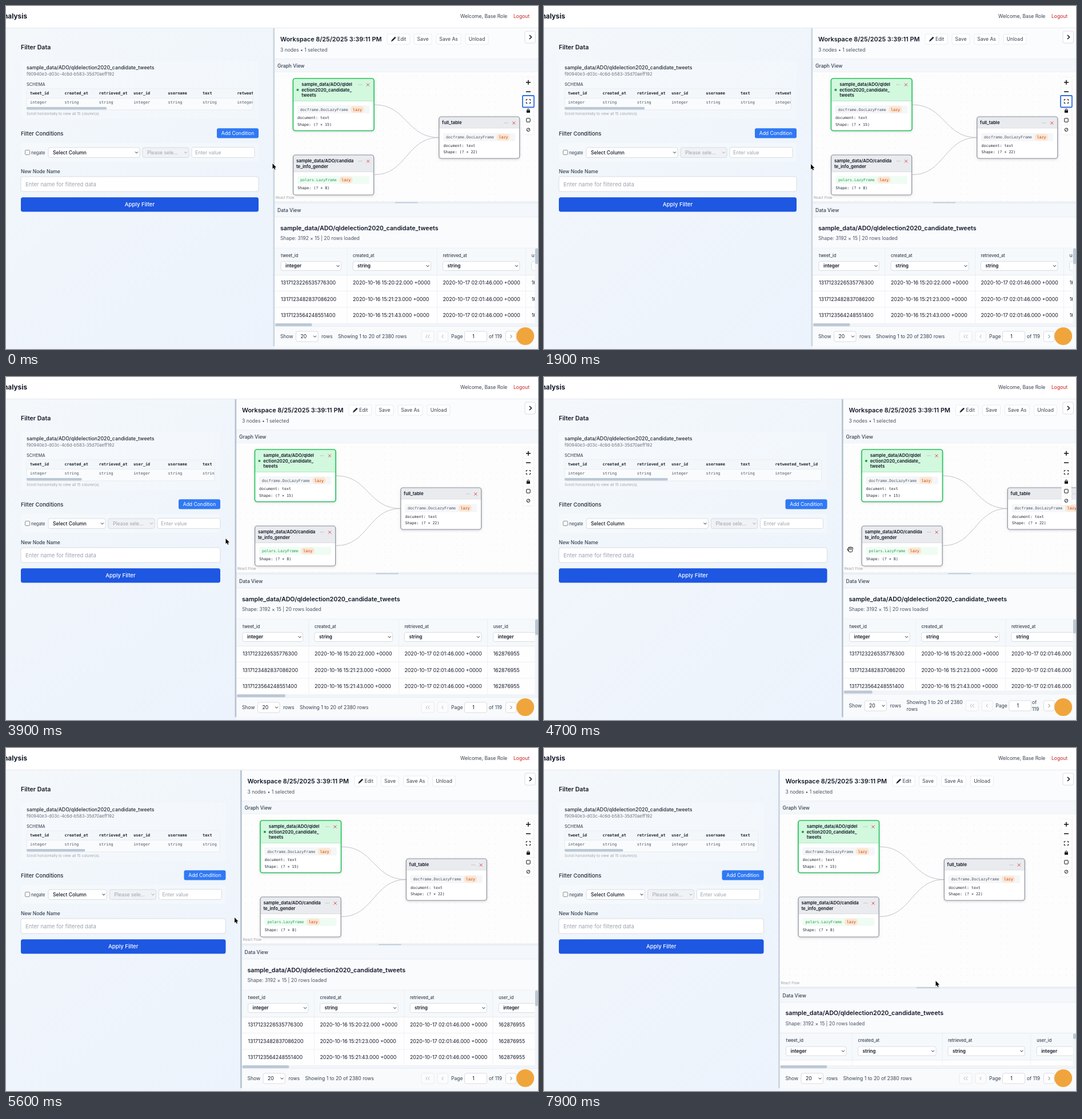
Animation of 931 by 601 pixels, one loop 8000 ms. Source, as an HTML page with a canvas:

```html
<!DOCTYPE html>
<html lang="en">
<head>
<meta charset="utf-8">
<title>Workspace panels</title>
<style>
html, body { margin: 0; width: 100%; height: 100%; overflow: hidden; background: #fff; }
canvas { display: block; width: 931px; height: 601px; }
</style>
</head>
<body>
<canvas id="stage"></canvas>
<script>
const W = 931, H = 601, LOOP = 8000, STEP = 100;
const canvas = document.getElementById('stage');
const c = canvas.getContext('2d');
const dpr = window.devicePixelRatio || 1;
canvas.width = W * dpr;
canvas.height = H * dpr;

const SANS = 'Inter, "Open Sans", sans-serif';
const MONO = '"DejaVu Sans Mono", monospace';
const INK = '#1f2937', MUTED = '#4b5563', FAINT = '#9ca3af', LINE = '#e3e7ed', EDGE = '#d1d5db';
const TABLE = 'sample_data/ADO/qldelection2020_candidate_tweets';

// Motion: [time, value...] keys, eased between neighbours
const splitKeys = [[2700, 470], [3900, 403], [4700, 523.5], [5500, 412.5]];
const paneKeys = [[6400, 342.5], [7200, 278], [7900, 418]];
const mouseKeys = [
  [0, 466.5, 276], [1900, 467, 277], [2700, 468, 278], [3900, 384.5, 283], [4700, 536, 302],
  [5500, 400, 297], [5700, 400, 297], [6400, 672, 341], [7200, 676, 266.5], [7900, 685.5, 408]
];

function at(keys, t) {
  const next = keys.findIndex(k => k[0] > t);
  if (next === 0) return keys[0].slice(1);
  if (next < 0) return keys[keys.length - 1].slice(1);
  const a = keys[next - 1], b = keys[next];
  const u = (t - a[0]) / (b[0] - a[0]), e = u * u * (3 - 2 * u);
  return a.slice(1).map((v, i) => v + (b[i + 1] - v) * e);
}

// Drawing helpers; text y is the middle of the capitals
function text(s, x, y, size = 8.55, color = INK, weight = 400, align = 'left', family = SANS) {
  c.font = `${weight} ${size}px ${family}`;
  c.fillStyle = color;
  c.textAlign = align;
  c.fillText(s, x, y + size * 0.36);
}
const mono = (s, x, y, color = INK, size = 6.65, weight = 400) =>
  text(s, x, y, size, color, weight, 'left', MONO);

function rect(x, y, w, h, fill) {
  c.fillStyle = fill;
  c.fillRect(x, y, w, h);
}

function box(x, y, w, h, fill, stroke, r = 3, lw = 0.8) {
  c.beginPath();
  c.roundRect(x, y, w, h, r);
  if (fill) { c.fillStyle = fill; c.fill(); }
  if (stroke) { c.strokeStyle = stroke; c.lineWidth = lw; c.stroke(); }
}

function line(points, color, lw = 1) {
  c.beginPath();
  for (let i = 0; i < points.length; i += 2) c.lineTo(points[i], points[i + 1]);
  c.strokeStyle = color;
  c.lineWidth = lw;
  c.stroke();
}

function disc(x, y, r, fill) {
  c.beginPath();
  c.arc(x, y, r, 0, 7);
  c.fillStyle = fill;
  c.fill();
}

function clipped(x, y, w, h, draw) {
  c.save();
  c.beginPath();
  c.rect(x, y, w, h);
  c.clip();
  draw();
  c.restore();
}

const chevron = (x, y, color = INK) => line([x - 2.4, y - 1.3, x, y + 1.3, x + 2.4, y - 1.3], color, 1);

function select(label, x, y, w, h, weight = 400, size = 8.6, off = false) {
  box(x, y, w, h, off ? '#f0f2f5' : '#fff', EDGE);
  text(label, x + 8, y + h / 2, size, off ? FAINT : '#111827', weight);
  chevron(x + w - 5.5, y + h / 2, off ? FAINT : INK);
}

function button(label, x, y, w, h = 18) {
  box(x, y, w, h, '#fff', LINE);
  text(label, x + w / 2, y + h / 2, 8.55, '#374151', 400, 'center');
}

function header() {
  rect(0, 0, W, 38, '#fff');
  rect(0, 38, W, 0.8, LINE);
  text('Analysis', 37, 18, 11.8, '#111827', 700, 'right');
  text('Welcome, Base Role', 795, 18, 8.55, '#374151');
  text('Logout', 888, 18, 8.55, '#c81e1e');
}

function filterPanel(R) {
  const g = c.createLinearGradient(0, 38, R, 601);
  g.addColorStop(0, '#f4f8fb');
  g.addColorStop(0.5, '#eff5fb');
  g.addColorStop(1, '#edf3fc');
  rect(0, 38, R, 563, g);
  const right = R - 28, mid = (26 + right) / 2;

  text('Filter Data', 26, 72.5, 10.6, '#111827', 600);
  box(26, 96, right - 26, 102, 'rgba(255,255,255,.2)', null, 4);
  text(TABLE, 36, 108, 8.75, INK, 500);
  text('f90940e3-d03c-4c6d-b583-35d70aeff192', 36, 119.5, 7.55, '#6b7280');
  text('SCHEMA', 36, 137, 7.5, '#4b5563', 500);

  const view = R - 74;
  box(36, 145, view, 37, '#f9fbfd', LINE, 2);
  clipped(36, 145, view, 37, () => {
    rect(36, 145.5, view, 15.5, '#f4f7fa');
    rect(36, 161, view, 0.7, LINE);
    const columns = ['tweet_id', 'created_at', 'retrieved_at', 'user_id', 'username', 'text', 'retweeted_tweet_id'];
    columns.forEach((name, i) => {
      const x = 42 + i * 60.4;
      mono(name, x, 153, INK, 6.9, 700);
      mono(i % 3 ? 'string' : 'integer', x, 169, MUTED, 6.9);
    });
    box(36, 177, view * view / 1118, 4.5, '#bcc8d5', null, 2.2);
  });
  text('Scroll horizontally to view all 15 column(s).', 36, 189, 6.45, FAINT);

  text('Filter Conditions', 26, 223.5, 9.5, INK, 500);
  box(right - 73, 214.2, 73, 17.3, '#3079f4', null, 3);
  text('Add Condition', right - 36.5, 223, 8.55, '#fff', 400, 'center');

  box(26, 240, right - 26, 33, 'rgba(255,255,255,.25)', null, 4);
  box(33.5, 252.5, 8, 8, '#fff', '#767676', 1.5);
  text('negate', 44, 257, 7.55, '#374151');
  const end = Math.max(174, R - 236);
  select('Select Column', 74, 248, end - 74, 17.5, 500, 8.5);
  select('Please sele...', end + 5, 248, 81, 17.5, 400, 8.6, true);
  box(end + 91, 247.5, 110, 18, '#fff', EDGE);
  text('Enter value', end + 97, 256.5, 8.6, FAINT);

  text('New Node Name', 26, 290, 8.55, '#374151', 500);
  box(26, 299, right - 26, 26, '#fff', EDGE, 3.5);
  text('Enter name for filtered data', 34, 312.5, 9.6, FAINT);
  box(26, 335.2, right - 26, 25.2, '#1d57e2', null, 3.5);
  text('Apply Filter', mid, 348, 9.6, '#fff', 500, 'center');
}

function titleBar(R) {
  rect(R, 38.8, W - R, 54, '#fbfcfd');
  text('Workspace 8/25/2025 3:39:11 PM', R + 10, 58.5, 10.85, '#111827', 600);
  text('3 nodes • 1 selected', R + 10, 76.5, 8.55, MUTED);
  box(R + 197, 49, 39.5, 18, '#fff', LINE);
  line([R + 205.6, 60.6, R + 211.6, 54.6], INK, 2.7);
  line([R + 204.3, 62, R + 206.5, 59.8], INK, 1.4);
  text('Edit', R + 215, 58, 8.55, '#374151');
  button('Save', R + 244, 49, 31);
  button('Save As', R + 283, 49, 43);
  button('Unload', R + 334, 49, 40);
  box(908, 44, 18.5, 21, '#fff', EDGE, 3);
  line([916, 51, 919.6, 54.5, 916, 58], '#111827', 1.6);
  rect(R, 92.5, W - R, 23.5, '#f4f7fb');
  rect(R, 92.5, W - R, 0.7, '#e8ecf2');
  rect(R, 115.6, W - R, 0.7, LINE);
  text('Graph View', R + 5, 104.5, 8.55, '#374151', 500);
}

function node(x, y, w, h, head, titles, rows, { live, pill, type, lazy }) {
  c.save();
  c.shadowColor = 'rgba(0,0,0,.18)';
  c.shadowBlur = 4;
  c.shadowOffsetY = 1.5;
  box(x, y, w, h, '#fff', null, 4);
  c.restore();
  box(x, y, w, head, live ? '#d2f8de' : '#e9ebee', null, [4, 4, 0, 0]);
  rect(x, y + head, w, 0.8, live ? '#9be7b4' : EDGE);
  box(x, y, w, h, null, live ? '#27c45f' : '#8b919d', 4, live ? 1.7 : 1.2);
  if (live) disc(x + 8, y + 20, 2.1, '#17a34a');
  titles.forEach((s, i) => text(s, x + (live ? 14.8 : 5.3), y + 10.2 + i * 9.6, 7.8, '#111827', 600));
  for (let i = 0; i < 3; i++) disc(x + 115 + i * 2.6, y + 10.8, 0.6, '#8b929c');
  line([x + 128.5, y + 8.5, x + 133.5, y + 13.5], '#e5484d', 1);
  line([x + 133.5, y + 8.5, x + 128.5, y + 13.5], '#e5484d', 1);
  const py = y + pill;
  box(x + 7.3, py - 7, w - 15, 14, type[0] === 'p' ? '#effcf3' : '#f5f6f8', null, 2);
  mono(type, x + 12.3, py, type[0] === 'p' ? '#1f9d4d' : MUTED);
  box(x + lazy, py - 5.8, 23, 11.6, '#fbe6d2', null, 5);
  mono('lazy', x + lazy + 3.6, py, '#c2410c');
  rows.forEach((s, i) => mono(s, x + 7.6, py + 14.4 + i * 11.5, INK));
}

function controls(focused) {
  c.save();
  c.shadowColor = 'rgba(0,0,0,.12)';
  c.shadowBlur = 2;
  rect(905.5, 125.5, 17.5, 99.5, '#fefefe');
  c.restore();
  for (let i = 1; i < 6; i++) rect(905.5, 125.5 + i * 16.6, 17.5, 0.6, '#eceef1');
  const x = 914, K = '#111';
  line([x - 4, 133.8, x + 4, 133.8], K, 1.5);
  line([x, 129.8, x, 137.8], K, 1.5);
  line([x - 4, 150.3, x + 4, 150.3], K, 1.4);
  for (const sx of [-1, 1]) for (const sy of [-1, 1])
    line([x + sx * 3.6, 167 + sy * 1.2, x + sx * 3.6, 167 + sy * 3.3, x + sx * 1.4, 167 + sy * 3.3], K, 1.1);
  rect(x - 3, 182.5, 6, 4.5, K);
  c.beginPath();
  c.arc(x, 182.3, 1.9, Math.PI, 0);
  c.strokeStyle = K;
  c.lineWidth = 1;
  c.stroke();
  box(x - 3.2, 196.8, 6.4, 6.4, null, K, 0.6, 1);
  c.beginPath();
  c.arc(x, 216.8, 2.8, 0, 7);
  c.lineWidth = 0.9;
  c.stroke();
  line([x - 1.9, 218.7, x + 1.9, 214.9], K, 0.8);
  if (focused) box(904, 157, 20, 20.5, null, '#2f6fe4', 1.5, 1.8);
}

function graph(R, V, focused) {
  clipped(R, 116, W - R, V - 116, () => {
    rect(R, 116, W - R, V - 116, '#fdfdfd');
    for (let x = R + 6; x < W; x += 11.5)
      for (let y = 122; y < V; y += 11.5) rect(x, y, 0.8, 0.8, '#d9dce3');
    for (const y of [173, 295.5]) {
      c.beginPath();
      c.moveTo(R + 175, y);
      c.bezierCurveTo(R + 231, y, R + 231, 230.5, R + 287.5, 230.5);
      c.strokeStyle = '#b1b1bb';
      c.lineWidth = 0.8;
      c.stroke();
    }
    node(R + 32.4, 127, 141.6, 91.5, 39, ['sample_data/ADO/qldel', 'ection2020_candidate_', 'tweets'],
      ['document: text', 'Shape: (? × 15)'], { live: true, pill: 54.3, type: 'docframe.DocLazyFrame', lazy: 101 });
    node(R + 32.6, 261, 141, 70, 29, ['sample_data/ADO/candida', 'te_info_gender'],
      ['Shape: (? × 8)'], { pill: 43.7, type: 'polars.LazyFrame', lazy: 81 });
    node(R + 287.8, 194, 141, 73, 19.5, ['full_table'],
      ['document: text', 'Shape: (? × 22)'], { pill: 35.8, type: 'docframe.DocLazyFrame', lazy: 101 });
    controls(focused);
    rect(R, V - 11, 36, 11, 'rgba(255,255,255,.5)');
    text('React Flow', R + 2, V - 6.5, 6.3, '#9a9ca3');
  });
}

function dataView(R, V, bottom, dragging) {
  rect(R, V, W - R, 596 - V, '#f9fbfd');
  rect(R, V, W - R, 4, dragging ? '#d9e0e8' : '#eaeff5');
  box((R + W) / 2 - 20, V + 1.2, 40, 1.6, '#b7c6d4', null, 0.8);
  rect(R, V + 4, W - R, 23, '#f4f7fb');
  rect(R, V + 27, W - R, 0.7, LINE);
  text('Data View', R + 5, V + 15.7, 8.55, '#374151', 500);
  text(TABLE, R + 10, V + 46.5, 10.68, '#111827', 600);
  text('Shape: 3192 × 15 | 20 rows loaded', R + 10, V + 64.5, 8.55, MUTED);

  const top = V + 81, view = 925.5 - R, tall = bottom - top;
  const columns = [
    ['tweet_id', 'integer', 11, 105.5], ['created_at', 'string', 137, 136.5],
    ['retrieved_at', 'string', 294.4, 134.5], ['user_id', 'integer', 449.7, 105]
  ];
  const ids = ['3226535776300', '3482837086200', '3564248551400', '3704678019000', '4150243152000'];
  const times = ['20:22', '21:23', '21:43', '22:16', '24:03'];
  clipped(R, top, view, tall, () => {
    rect(R, top, view, tall, '#fefefe');
    rect(R, top, view, 47.5, '#f6f9fb');
    rect(R, top, view, 0.8, LINE);
    rect(R, top + 47.5, view, 0.8, LINE);
    columns.forEach(([name, type, x, w]) => {
      text(name, R + x, V + 94.5, 7.5, '#374151', 500);
      select(type, R + x, V + 105, w, 16, 600, 8.2);
    });
    ids.forEach((id, i) => {
      const y = V + 142.7 + i * 28.35;
      const row = ['131712' + id, `2020-10-16 15:${times[i]}.000 +0000`, '2020-10-17 02:01:46.000 +0000', '162876955'];
      row.forEach((s, k) => text(s, R + columns[k][2], y, 8.8, '#111827'));
      rect(R, y + 14, view, 0.8, '#e8ebf0');
    });
    for (const x of [126.5, 284, 439]) rect(R + x, top, 0.7, tall, '#e8ebf0');
  });
  rect(R, bottom, W - R, 5, '#f1f4f8');
  box(R + 1, bottom, view * view / 3215, 5, '#bcc8d5', null, 2.5);
  rect(925.5, top, 5.5, tall, '#f1f4f8');
  box(926, top + 1, 5, Math.max(10, tall * tall / 635), '#bcc8d5', null, 2.5);
}

function pager(R, wrap) {
  const y = wrap ? 576 : 579, gray = '#374151', shift = wrap ? 11.3 : 0;
  rect(R, wrap ? 555 : 561, W - R, 41, '#f8fafc');
  rect(R, wrap ? 555 : 561, W - R, 0.7, LINE);
  text('Show', R + 10, y, 8.55, gray);
  select('20', R + 37.5, y - 9, 38.5, 18);
  text('rows', R + 82, y, 8.55, gray);
  if (wrap) {
    text('Showing 1 to 20 of 2380', R + 111, 569.7, 8.55, gray);
    text('rows', R + 111, 582, 8.55, gray);
    text('of', 854, 569.7, 8.55, gray);
    text('119', 854, 582, 8.55, gray);
  } else {
    text('Showing 1 to 20 of 2380 rows', R + 111, y, 8.55, gray);
    text('of 119', 845, y, 8.55, gray);
  }
  const arrow = (x, dir, color) => line([x - dir * 1.3, y - 3, x + dir * 1.3, y, x - dir * 1.3, y + 3], color, 0.8);
  box(727 + shift, y - 9, 22, 18, '#fcfcfd', LINE);
  arrow(736 + shift, -1, FAINT);
  arrow(740 + shift, -1, FAINT);
  box(755 + shift, y - 9, 18.5, 18, '#fcfcfd', LINE);
  arrow(764 + shift, -1, FAINT);
  text('Page', 779 + shift, y, 8.55, gray);
  box(802.5 + shift, y - 9, 39, 18, '#fff', EDGE);
  text('1', 818 + shift, y, 8.55, '#111827', 400, 'center');
  box(874.5, y - 9, 18.5, 18, '#fff', EDGE);
  arrow(884, 1, MUTED);
}

function pointer(x, y) {
  c.beginPath();
  [[0, 0], [0, 9.3], [2.1, 7.4], [3.6, 10.8], [5.1, 10.1], [3.6, 6.9], [6.4, 6.7]]
    .forEach(([px, py]) => c.lineTo(x + px, y + py));
  c.closePath();
  c.lineJoin = 'round';
  c.strokeStyle = '#fff';
  c.lineWidth = 1.4;
  c.stroke();
  c.fillStyle = '#000';
  c.fill();
}

function hand(x, y) {
  const finger = points => {
    line(points, '#111', 2.9);
    line(points, '#fff', 1.3);
  };
  c.save();
  c.lineCap = c.lineJoin = 'round';
  finger([x - 4, y + 0.2, x - 2, y + 2.6]);
  box(x - 2.8, y - 0.2, 6.4, 4.8, '#fff', '#111', 2, 1);
  [-2.4, -0.6, 1.2, 3].forEach((fx, i) =>
    finger([x + fx * 1.15, y - 3.4 + Math.abs(i - 1.4) * 0.7, x + fx, y + 0.6]));
  rect(x - 2.2, y + 0.8, 5.2, 2.6, '#fff');
  c.restore();
}

function render(t) {
  const [R] = at(splitKeys, t), [V] = at(paneKeys, t), [mx, my] = at(mouseKeys, t);
  const wrap = R > 484, sizing = t > 2300 && t < 5800;
  c.setTransform(dpr, 0, 0, dpr, 0, 0);
  rect(0, 0, W, H, '#f4f8fd');
  filterPanel(R);
  titleBar(R);
  graph(R, V, t < 2500);
  dataView(R, V, wrap ? 549.5 : 556, t > 6300 && t < 7700);
  pager(R, wrap);
  rect(R, 596, W - R, 5, '#f4f8fd');
  rect(R - 2.5, 38.8, 2.7, 557.2, sizing ? '#b7c3cf' : '#cbd5e0');
  header();
  disc(908.7, 578.5, 15.5, '#f0a53c');
  const overGraph = mx > R + 3 && my > 116 && my < V - 10.7;
  (overGraph ? hand : pointer)(mx, my);
}

const start = performance.now();
function tick() {
  const t = (performance.now() - start) % LOOP;
  render(Math.floor(t / STEP) * STEP);
  requestAnimationFrame(tick);
}
tick();
</script>
</body>
</html>
```
